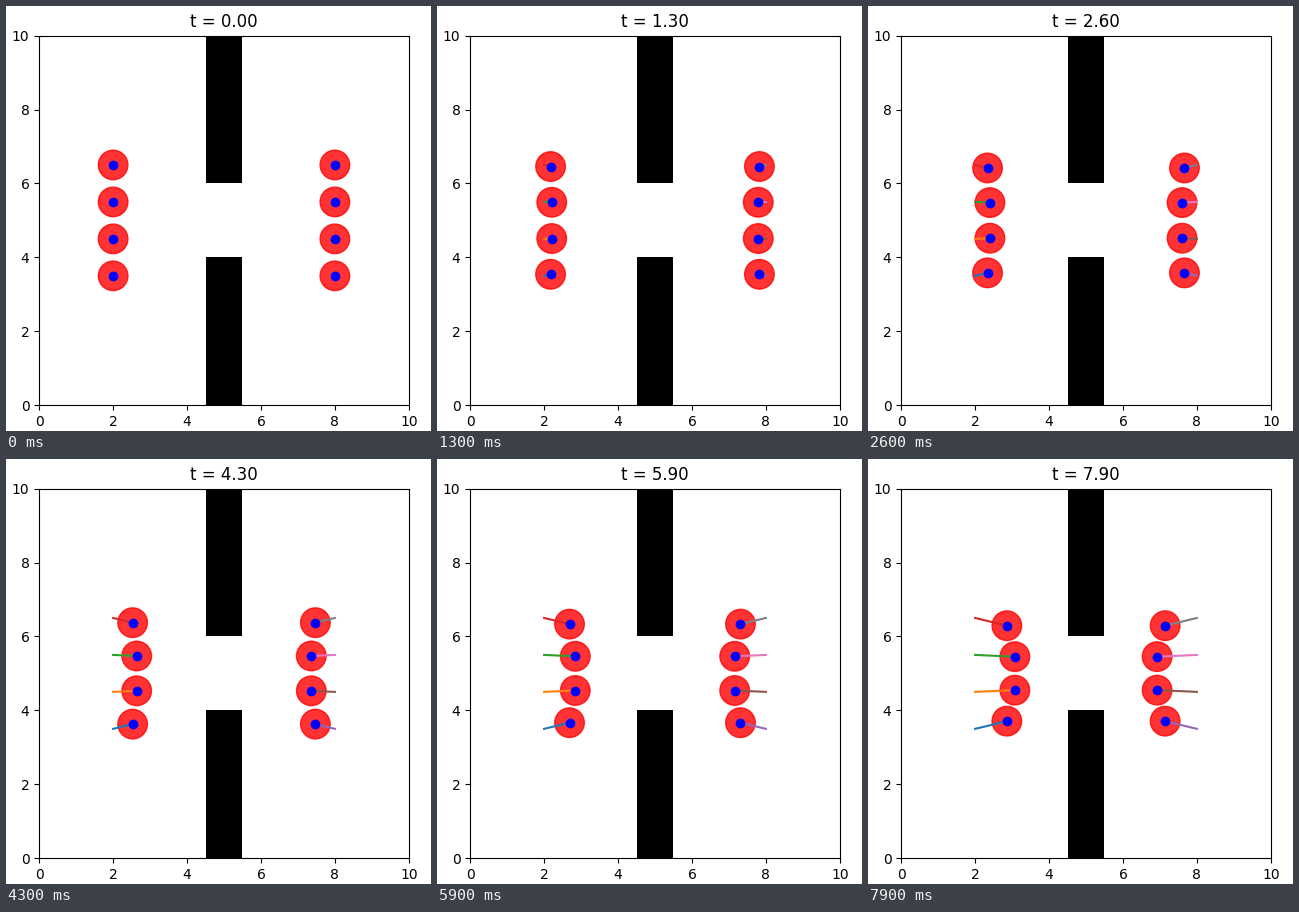
Write a matplotlib script that moves like this. It is 425 by 425 pixels and loops after 8000 ms.

```python
import numpy as np
import matplotlib.pyplot as plt
from matplotlib.animation import FuncAnimation
from matplotlib.patches import Circle, Rectangle

SIZE, DPI, SIDE = 425, 100, 369.6
FRAMES, DT = 80, 0.1
CENTER = 5

plt.rcParams["font.family"] = "DejaVu Sans"
fig = plt.figure(figsize=(SIZE / DPI, SIZE / DPI), dpi=DPI, facecolor="white")
ax = fig.add_axes([33.2 / SIZE, 25.8 / SIZE, SIDE / SIZE, SIDE / SIZE])
ax.set(xlim=(0, 10), ylim=(0, 10))
ax.set_xticks(range(0, 11, 2))
ax.set_yticks(range(0, 11, 2))
title = ax.set_title("t = 0.00", fontsize=12)

# Two wall segments leave a gap in the middle
for y in (0, 6):
    ax.add_patch(Rectangle((4.5, y), 1, 4, color="black", lw=0))


def walk(start, t):
    """Position of an agent slowing down on its way to the gap."""
    x0, y0 = start
    if abs(y0 - CENTER) > 1:
        dx, dy = 0.1395 * t - 0.0039 * t**2, 0.0335 * t - 0.0009 * t**2
    else:
        dx, dy = 0.163 * t - 0.0034 * t**2, 0.0075 * t - 0.0002 * t**2
    return x0 + np.sign(CENTER - x0) * dx, y0 + np.sign(CENTER - y0) * dy


starts = [(x, y) for x in (2, 8) for y in (3.5, 4.5, 5.5, 6.5)]
bodies = [ax.add_patch(Circle(s, 0.4, color="red", alpha=0.8)) for s in starts]
trails = [ax.plot([], [], color=f"C{k}", lw=1.5)[0] for k in range(len(starts))]
dots, = ax.plot([], [], "bo", ms=6)


def update(i):
    times = np.arange(i + 1) * DT
    title.set_text(f"t = {i * DT:.2f}")
    ends = []
    for start, body, trail in zip(starts, bodies, trails):
        xs, ys = walk(start, times)
        trail.set_data(xs, ys)
        body.center = xs[-1], ys[-1]
        ends.append(body.center)
    dots.set_data(*zip(*ends))
    return [title, dots, *bodies, *trails]


anim = FuncAnimation(fig, update, frames=FRAMES, interval=100,
                     repeat=True, repeat_delay=0, blit=False)
plt.show()
```
